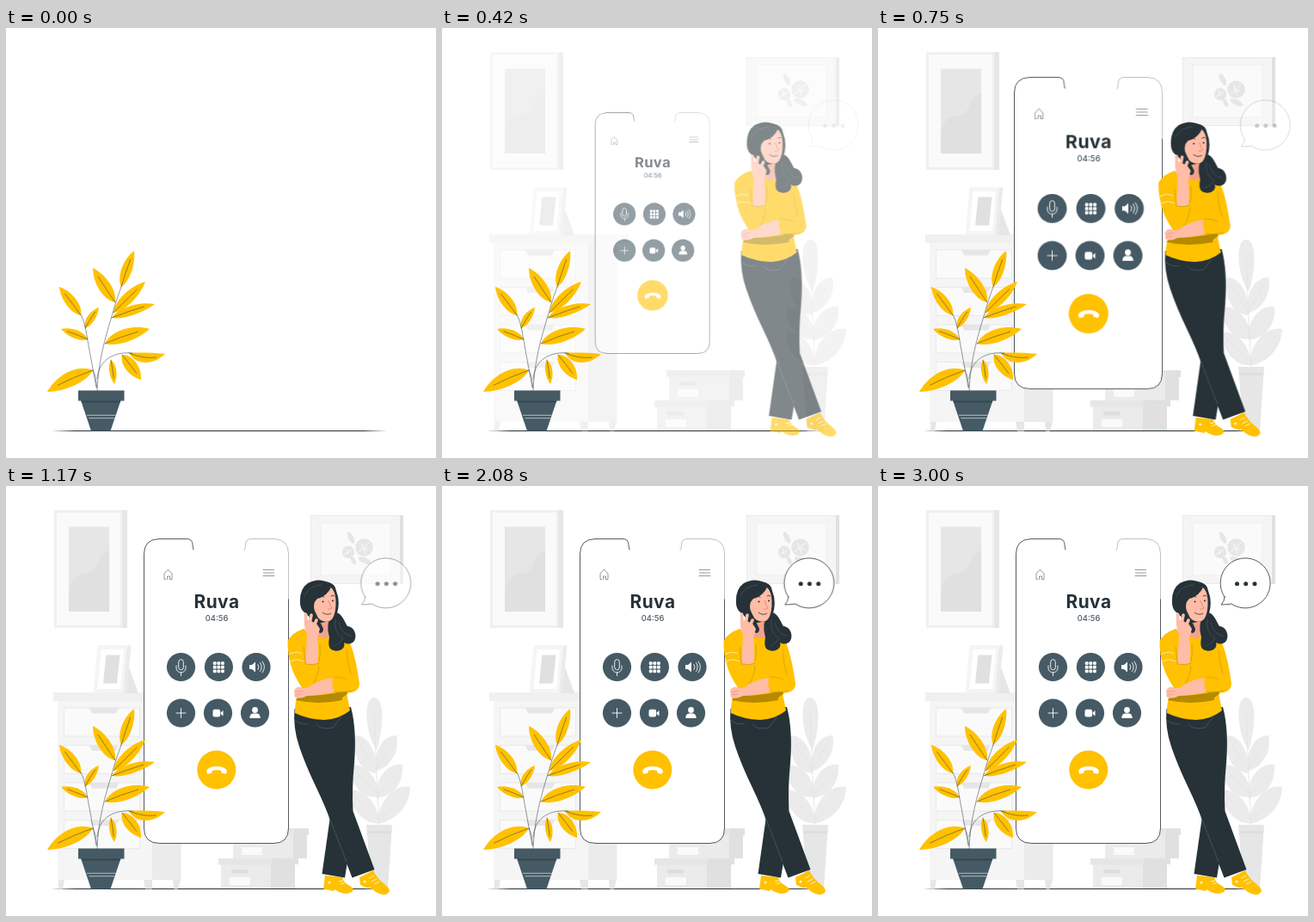
Recreate the animation shown at these times as an HTML page. Size 500 px wide and 500 px high, loop 3040 ms.

```html
<!DOCTYPE html>
<html lang="en">
<head>
<meta charset="utf-8">
<title>Phone call</title>
<style>
html, body { margin: 0; width: 100%; height: 100%; overflow: hidden; background: #fff; }
svg { display: block; width: 100vw; height: 100vh; }
text { font-family: Inter, "Open Sans", sans-serif; text-anchor: middle; }
.ink { fill: none; stroke: #263238; stroke-width: .8; stroke-linecap: round; stroke-linejoin: round; }
.fine { stroke-width: .5; }
.icon { fill: none; stroke: #fff; stroke-width: .9; stroke-linecap: round; }

#scene, #room, #phone, #woman, #bubble { animation: 3040ms linear infinite; }
#scene { animation-name: reveal; }
#room { animation-name: fade; }
#phone { animation-name: zoom; transform-origin: 245px 238.5px; }
#woman { animation-name: slide; }
#bubble { animation-name: drift; }

@keyframes reveal { 0%, 4.26% { opacity: 0; } 4.27%, 100% { opacity: 1; } }
/* 32.895% is 1 s, 98.684% is 3 s */
@keyframes fade {
  0% { opacity: 0; animation-timing-function: cubic-bezier(.36,-.01,.5,1.38); }
  32.895%, 100% { opacity: 1; }
}
@keyframes zoom {
  0% { opacity: 0; transform: scale(.5); animation-timing-function: cubic-bezier(.36,-.01,.5,1.38); }
  32.895%, 100% { opacity: 1; transform: scale(1); }
}
@keyframes slide {
  0% { opacity: 0; transform: translateX(30px); animation-timing-function: cubic-bezier(.36,-.01,.5,1.38); }
  32.895%, 100% { opacity: 1; transform: none; }
}
@keyframes drift {
  0% { opacity: 0; transform: translateX(30px); animation-timing-function: cubic-bezier(.36,-.01,.5,1.38); }
  98.684%, 100% { opacity: 1; transform: none; }
}
</style>
</head>
<body>
<svg viewBox="0 0 500 500">
  <path fill="#263238" d="M52 468.5L80 468.1H415L443 468.5L415 468.9H80Z"/>

  <g id="scene">
    <g id="room">
      <!-- tall picture -->
      <path fill="#e6e6e6" d="M56 28H141V165H56Z"/>
      <path fill="#f0f0f0" d="M56 28H135.5V165H56Z"/>
      <path fill="#fafafa" d="M59 31H133V162H59Z"/>
      <path fill="#e6e6e6" d="M73 47.5H120V146H73Z"/>
      <path fill="#e0e0e0" d="M73 146V121C76 107 84 103 92 102C109 101 103 82 120 75V146Z"/>
      <!-- wide picture -->
      <path fill="#e0e0e0" d="M354 34H462V114H354Z"/>
      <path fill="#f5f5f5" d="M354.500 34.500H458V113.500H354.500Z"/>
      <path fill="#fafafa" d="M366 43H447V104H366Z"/>
      <path fill="none" stroke="#ebebeb" stroke-width=".7" d="M366 43H447V104H366ZL354.500 34.500M458 34.500L447 43M458 113.500L447 104M354.500 113.500L366 104"/>
      <g fill="#e6e6e6">
        <circle cx="398" cy="77" r="7.200"/><circle cx="416.500" cy="71.500" r="10.200"/>
        <ellipse cx="401" cy="60" rx="3" ry="7.500" transform="rotate(-28 401 60)"/>
        <ellipse cx="417" cy="86.500" rx="3.400" ry="8" transform="rotate(-65 417 86.500)"/>
        <ellipse cx="404" cy="87" rx="2.400" ry="5" transform="rotate(-25 404 87)"/>
      </g>
      <path fill="none" stroke="#fff" stroke-width=".8" d="M393 80L402 74M396 73L398 79M410 77L422 66M414 66L415 73L421 73M418 79L416 72"/>
      <!-- cabinet -->
      <path fill="#e6e6e6" d="M61 458H68L66 468.500H61ZM160 458H170V468.500H162ZM194 458H203L200 468.500H195Z"/>
      <path fill="#ebebeb" d="M169 249H203.500V458H169Z"/>
      <path fill="#f5f5f5" d="M60 249H170V458H60Z"/>
      <path fill="#ebebeb" d="M176 240H217V250H176Z"/>
      <path fill="#f0f0f0" d="M55 240H176V250H55Z"/>
      <g id="drawers"></g>
      <!-- standing photo -->
      <path fill="#e6e6e6" d="M142 208L154 241H140Z"/>
      <path fill="#ebebeb" d="M107 185.500H145.500L140 240.500H102Z"/>
      <path fill="#f5f5f5" d="M107 185.500H141L136 240.500H102Z"/>
      <path fill="#fff" d="M110.500 190H137L133 236H106.500Z"/>
      <path fill="#e0e0e0" d="M116.500 196.500H132.500L129 229.500H113Z"/>
      <!-- boxes -->
      <path fill="#e0e0e0" d="M334 398H352V406H350V433H334ZM308 433H340V440H336V468H308Z"/>
      <path fill="#ebebeb" d="M264 405H334V433H264ZM250 440H308V468H250Z"/>
      <path fill="#e6e6e6" d="M261 398H335V405.500H261ZM247 433H309V440.500H247Z"/>
      <path fill="#fafafa" d="M274 420H298V429H274ZM260 455H284V464H260Z"/>
      <path fill="#dedede" d="M276 411H295V415.500H276ZM262 446H281V450.500H262Z"/>
      <!-- pale plant -->
      <g fill="#ebebeb">
        <path d="M428 246C441 246 439 282 431 307C416 285 416 246 428 246Z"/>
        <path d="M431 334C409 332 403 309 406 290C421 290 432 309 431 334Z"/>
        <path d="M430 332C427 305 440 290 454 290C458 308 448 326 430 332Z"/>
        <path d="M433 361C413 366 399 343 401 325C419 321 434 342 433 361Z"/>
        <path d="M431 363C428 340 445 321 461 324C463 346 449 361 431 363Z"/>
        <path d="M434 392C415 394 399 373 400 354C417 351 434 371 434 392Z"/>
        <path d="M432 393C432 366 452 346 470 350C469 373 453 389 432 393Z"/>
      </g>
      <path fill="none" stroke="#e3e3e3" stroke-width=".8" d="M428 260Q430 330 434 395M411 300L430 330M449 299L431 329M407 333L432 358M456 332L432 360M406 362L433 388M463 357L434 389"/>
      <path fill="#e6e6e6" d="M419 394H449L444 468.500H425Z"/>
      <path fill="#dedede" d="M420 401H448.500L448 404H420.500Z"/>
    </g>

    <g id="phone">
      <path fill="#fff" d="M178 61.500H210Q217 61.500 217 68.500Q217 77 225 77H270Q278.500 77 278.500 68.500Q278.500 61.500 285 61.500H312Q328.500 62 328.500 79V398Q328.500 415.500 311 415.500H179Q160.500 415.500 160.500 398V79Q160.500 62 178 61.500Z"/>
      <path class="ink" d="M218 74Q217 71 217 68.500Q217 61.500 210 61.500H178Q160.500 62 160.500 79V398Q160.500 415.500 179 415.500H311Q328.500 415.500 328.500 398V132"/>
      <path class="ink fine" opacity=".6" d="M277 74.500Q278.500 72 278.500 68.500Q278.500 61.500 285 61.500H312Q328.500 62 328.500 79V132"/>
      <path class="ink fine" d="M185.500 108.500H184V102L188.500 97L193 102V108.500H190.500V105H187.500V108.500M299 97.500H311.500M299.500 101H311.500M299 104.500H312"/>
      <text x="245" y="142" font-size="20.800" font-weight="700" letter-spacing=".5" fill="#263238">Ruva</text>
      <text x="245" y="157" font-size="9.400" font-weight="500" fill="#455a64">04:56</text>
      <g id="buttons" fill="#455a64"></g>
      <circle cx="244.800" cy="330" r="22.500" fill="#ffc100"/>
      <path class="icon" d="M200.700 204.500a2.800 2.800 0 0 1 5.600 0v6.500a2.800 2.800 0 0 1-5.600 0ZM198 209v2.500a5.500 5.500 0 0 0 11 0V209M203.500 217V220.500M198 264H209M203.500 258.500V269.500M293 207.500q2 3 0 6M295.500 205.500q3.500 5 0 10M298 204q5 6.500 0 13"/>
      <g fill="#fff">
        <path d="M283 208h3l4-3.500v12l-4-3.500h-3Z"/>
        <g id="keys"></g>
        <rect x="240.500" y="259.800" width="8.600" height="8.600" rx="2"/>
        <path d="M249.600 263.500L252.500 261V267.500L249.600 265Z"/>
        <circle cx="289.500" cy="260.500" r="3.400"/>
        <path d="M283.300 270Q283.300 265 287 264.500H292Q295.700 265 295.700 270Z"/>
        <path d="M233 331.500Q235 326 245 326Q255 326 257 331.500L256 334.500Q253 335 250.500 333.500L250 330.800Q245 329.500 240 330.800L239.500 333.500Q237 335 234 334.500Z"/>
      </g>
    </g>

    <g id="woman">
      <!-- shoes -->
      <path fill="#ffc100" d="M371 453L391 455Q393 462 400 465Q406 469 402 472Q396 476 387 472L382 469L381 471L369 468.500ZM411 455L427 447Q431 456 440 463Q448 469 445 473Q439 478 430 472L422 466V468L412 464Z"/>
      <path fill="none" stroke="#fff" stroke-width=".8" d="M387 460L392 459M389 463L394 461M422 456L428 453M425 460L431 457M428 463L434 460"/>
      <circle cx="376" cy="461" r="1.600" fill="#fff3c4"/><circle cx="417" cy="460" r="1.600" fill="#fff3c4"/>
      <!-- trousers -->
      <path fill="#263238" d="M377 384L367.500 451L394 455.500L399 425L402 360Z"/>
      <path fill="#263238" d="M335.500 259Q333.500 281 341 303Q348 324 361 351Q372 374 377 389L402.500 455.500L428.500 446L403.500 378Q402 352 405 322Q408 283 401 257Z"/>
      <path fill="none" stroke="#59686f" stroke-width=".6" d="M377 388L396 437M336 272Q344 279 352 276M361 277Q366 284 380 281L390 268"/>
      <!-- neck and jumper -->
      <path fill="#f2a28c" d="M361 150H379L378 176Q369 184 360 174Z"/>
      <path fill="#ffc100" d="M346 166Q332 171 327.500 180Q327 196 333 213Q337 224 345 236L338 246Q335.500 255 336 264Q350 271 370 272Q388 271 400 261L396 241Q411 240 411 230Q407 200 400 182Q391 176 378 173Q372 181 361 174Z"/>
      <!-- folded arm -->
      <path fill="#b58900" d="M341 243Q362 246 396 238L397 242Q389 246 391 249Q362 255 337 249Z"/>
      <path fill="#ffbda7" d="M384 223Q371 223 360 229L344 234Q337 233 335 238L336 246Q343 248 350 244Q368 243 384 239Z"/>
      <path fill="#ffc100" d="M381 221Q393 218 399 220L409 222Q413 234 404 238Q393 240 382 239Q377 229 381 221Z"/>
      <path fill="none" stroke="#d39f00" stroke-width=".7" d="M381 222Q391 222 397 225M396 190Q397 206 401 219M381 239Q391 241 403 238"/>
      <path fill="none" stroke="#e88d75" stroke-width=".6" d="M337 240L345 238M336 243L344 242"/>
      <!-- ponytail -->
      <path fill="#263238" d="M380 147C390 145 393 157 397 163C407 164 409 178 403 182Q398 185 393 182C396 190 384 195 377 189Q374 185 376 176Q371 160 380 147Z"/>
      <path fill="none" stroke="#4c5b62" stroke-width=".6" d="M383 155Q381 171 392 177Q388 184 381 186M387 159Q391 174 402 174"/>
      <!-- head -->
      <path fill="#263238" d="M342 136Q341 120 351 113Q362 107 372 111Q383 113 384 122Q389 134 385 148L381 156L362 160L347 147Q342 143 342 136Z"/>
      <path fill="#ffbda7" d="M362 126Q371 123 377 117Q383 122 383.500 133Q384 148 379 155Q374 160 366 156Q358 151 358 140Q359 131 362 126Z"/>
      <path fill="#263238" d="M358 136Q358 124 369 121L379 116Q373 129 362 131Z"/>
      <path class="ink" d="M364 130Q367 127 370 129M378 128Q380 126 382 128"/>
      <circle cx="368.500" cy="134.500" r="1" fill="#263238"/><circle cx="380" cy="133.500" r="1" fill="#263238"/>
      <path fill="none" stroke="#d9735e" stroke-width=".7" d="M375 133Q377 140 379 142Q376 144 374 143"/>
      <path fill="none" stroke="#263238" stroke-width=".8" d="M368 147Q373 151 378 148"/>
      <path fill="none" stroke="#56656c" stroke-width=".5" d="M347 128Q352 116 367 115"/>
      <!-- raised arm -->
      <path fill="#263238" d="M350 142Q353 138 357 141L369 166Q369 171 365 171L361 168L349 146Z"/>
      <path fill="#ffbda7" d="M350 174Q346 164 347 154L361 160L365 166L362 177Q365 198 361 212Q354 218 348 212Z"/>
      <path fill="none" stroke="#ffbda7" stroke-width="3.600" stroke-linecap="round" d="M349 158L348.500 149M353 161L355 150M358 163L361 156"/>
      <path fill="#ffc100" d="M328 180Q344 176 346 186L348.500 207Q357 209 364 206Q364 216 360 226Q354 236 345 235Q334 220 331 207Z"/>
      <path fill="none" stroke="#d39f00" stroke-width=".8" d="M346 187L348.500 207Q357 209 364 206M364 209Q363 222 357 230M365 184Q366 195 364 204"/>
      <path fill="none" stroke="#ffe59a" stroke-width="1.100" d="M329 196Q336 191 344 195M331 204Q338 200 346 204"/>
    </g>

    <g id="bubble">
      <path class="ink" style="fill:#fff" d="M403 129Q403 134 399 138Q405 138 411 137A29 29 0 1 0 403 129Z"/>
      <g fill="#263238"><circle cx="417.500" cy="113.700" r="2.500"/><circle cx="427.700" cy="113.700" r="2.500"/><circle cx="438" cy="113.700" r="2.500"/></g>
    </g>
  </g>

  <g id="plant">
    <g id="leaves"></g>
    <path class="ink fine" d="M106 422C107 395 112 372 120 345C126 325 128 317 134 301M105 418C99 385 96 370 93 352C91 342 89 337 87 333M106 408C108 385 126 376 147 378M101 398Q105 405 105.500 418"/>
    <path fill="#455a64" d="M87 433H133.500L121.500 468.500H99Z"/>
    <path fill="#37474f" d="M87.500 433H133.300L132.700 435.500H88.300Z"/>
    <path fill="#455a64" d="M84 421.500H137.500V433.500H84Z"/>
    <path fill="none" stroke="#fff" stroke-width=".6" d="M94 450.300H127.500M96.500 453.700H126"/>
  </g>
</svg>
<script>
const fill = (id, html) => { document.getElementById(id).innerHTML = html; };

// base x, base y, tip x, tip y, bulge on the left, bulge on the right
const leaves = [
  [134, 301, 149, 259, 9, 7], [127, 319, 101, 279, 10, 9],
  [125, 331, 162, 295, 9, 8], [123, 337, 173, 321, 9, 6],
  [115, 367, 167, 350, 12, 8], [143, 378, 185, 379, 1, 14],
  [135, 380, 157, 409, 10, 9], [122, 386, 126, 414, 6, 5],
  [87, 334, 62, 301, 8, 9], [92, 349, 108, 325, 7, 5],
  [95, 362, 64, 350, 6, 7], [101, 398, 48, 423, 9, 14]
];

function leaf([x, y, tx, ty, left, right]) {
  const dx = tx - x, dy = ty - y, len = Math.hypot(dx, dy);
  const at = (k, off) =>
    `${(x + dx * k + dy / len * off).toFixed(1)} ${(y + dy * k - dx / len * off).toFixed(1)}`;
  const bend = (left - right) / 3;
  return `<path fill="#ffc100" d="M${x} ${y}C${at(.2, left)} ${at(.68, left)} ${tx} ${ty}` +
    `C${at(.68, -right)} ${at(.2, -right)} ${x} ${y}Z"/>` +
    `<path class="ink fine" d="M${x} ${y}Q${at(.4, bend * 1.5)} ${at(.75, bend)}"/>`;
}
fill('leaves', leaves.map(leaf).join(''));

fill('drawers', [258, 301.5, 345, 388.5].map(y =>
  `<rect x="67.500" y="${y}" width="88" height="33" fill="#fafafa" stroke="#e6e6e6" stroke-width=".8"/>` +
  `<path fill="#e6e6e6" d="M97 ${y}h34l-3 6.500h-28Z"/>`).join(''));

const buttons = [[203.5, 210.5], [247.4, 210.5], [291, 210.5], [203.5, 264], [246.5, 264], [289.5, 264]];
fill('buttons', buttons.map(([x, y]) => `<circle cx="${x}" cy="${y}" r="16.600"/>`).join(''));

fill('keys', Array.from({ length: 9 }, (_, i) =>
  `<rect x="${240.8 + i % 3 * 4.6}" y="${204.2 + Math.floor(i / 3) * 4.6}" width="3.800" height="3.800" rx="1.200"/>`).join(''));
</script>
</body>
</html>
```
